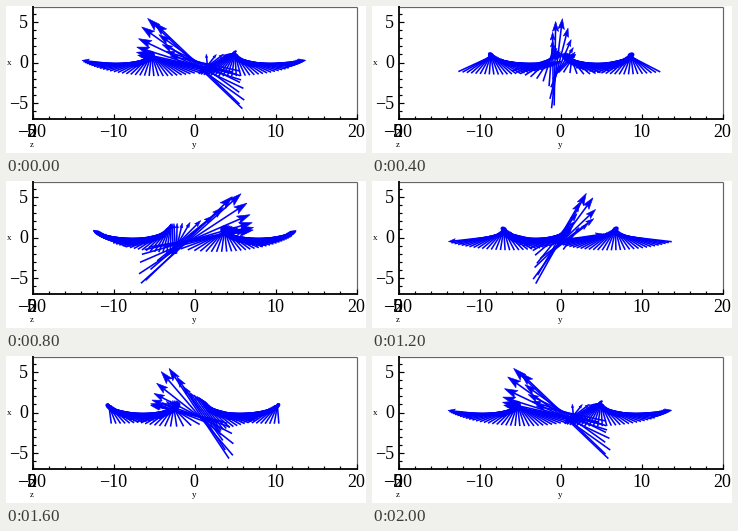
A matplotlib script for the animation above (2100 ms loop, 360x147 px).

```python
import numpy as np
import matplotlib.pyplot as plt
from matplotlib.animation import FuncAnimation
from matplotlib.collections import LineCollection, PolyCollection

W, H, DPI = 360, 147, 100
PX = 72 / DPI                      # one pixel in points
UNIT = 8.1                         # pixels per data unit
CX, CY = 188, 56                   # pixel position of the data origin
FRAMES, PERIOD = 21, 20
BLUE = "#0000ff"

HALF_WAVE = 8.75
K = np.pi / HALF_WAVE
Y = np.arange(-10.375, 10.5, 0.25)  # arrow midpoints along the y axis
R, SIDE = np.abs(Y), np.sign(Y)


def field(frame):
    """Half vectors (y, x) of the field at every midpoint."""
    wt = 2 * np.pi * frame / PERIOD
    swing = np.cos(wt - 0.6 * np.pi)

    # outgoing wave: arrows turn about fronts that run away from the centre
    front = 5.15 + HALF_WAVE * wt / np.pi
    front = front + 0.4 * SIDE * swing / (1 + (R / 6) ** 2)
    bias = 0.35 * SIDE * np.cos(K * R - wt)
    psi = K * (R - front)
    psi = (psi + np.pi / 2 - bias) % np.pi - np.pi / 2 + bias
    far_y = -3.6 * SIDE * np.sin(psi)
    far_x = (1.75 - 0.05 * R) * np.cos(psi)

    # strong field close to the swinging source
    d = Y + 0.55 * swing
    near_y = -6.2 * np.cos(wt + np.pi / 8) + 0.8 * np.tanh(d / 0.3)
    peak = 1 / (1 + (d / 0.6) ** 2)
    near = 1 / (1 + (Y / 1.5) ** 4)
    vy = near * near_y + (1 - near) * far_y
    vx = 5.6 * peak + (1 - near) * far_x
    return vy, vx


def arrows(frame):
    """Shaft segments and head polygons in pixels."""
    vy, vx = field(frame)
    mid = np.column_stack([CX + UNIT * Y, np.full_like(Y, CY + 1.5)])
    half = UNIT * np.column_stack([vy, -vx])
    tail, tip = mid - half, mid + half
    size = 2 * np.hypot(*half.T)[:, None]
    along = 2 * half / np.maximum(size, 1e-6)
    across = along[:, ::-1] * [-1, 1]
    head = np.minimum(13, 1.5 + 0.1 * size)
    back, notch = tip - along * head, tip - along * head * 0.8
    wing = across * head * 0.31
    shafts = np.stack([tail, notch], axis=1)
    heads = np.stack([tip, back + wing, notch, back - wing], axis=1)
    return shafts, heads


fig = plt.figure(figsize=(W / DPI, H / DPI), dpi=DPI, facecolor="white")
ax = fig.add_axes([0, 0, 1, 1])
ax.set_xlim(0, W)
ax.set_ylim(H, 0)
ax.axis("off")


def line(x0, y0, x1, y1, width=1.0, color="black"):
    ax.plot([x0, x1], [y0, y1], color=color, lw=width * PX,
            solid_capstyle="butt", zorder=1)


def label(x, y, s, size=18, ha="center"):
    ax.text(x, y, s, family="Liberation Serif", size=size * PX, ha=ha,
            va="center_baseline", color="black", zorder=4)


LEFT, RIGHT, TOP, BOTTOM = 26.5, 350.5, 0.5, 112.5
line(LEFT, TOP, RIGHT, TOP, 1.2, "#666666")
line(RIGHT, TOP, RIGHT, BOTTOM, 1.2, "#666666")
line(LEFT, 0, LEFT, BOTTOM + 1, 1.8)
line(LEFT - 1, BOTTOM, RIGHT + 1, BOTTOM, 1.8)

for v in range(-20, 21, 2):
    x = CX + 0.5 + UNIT * v
    line(x, BOTTOM, x, BOTTOM - (5 if v % 10 == 0 else 3), 1.2)
for v in range(-6, 7):
    y = CY + 0.5 - UNIT * v
    line(LEFT, y, LEFT + (5 if v % 5 == 0 else 3), y, 1.2)

for v in (-20, -10, 0, 10, 20):
    label(CX + UNIT * v, 124.5, str(v).replace("-", "\u2212"))
for v in (-5, 0, 5):
    s = str(v).replace("-", "\u2212")
    label(22, CY - UNIT * v, s, ha="right")
    label(30, 124.5, s, ha="right")
label(3.5, 56, "x", 9)
label(188, 138, "y", 9)
label(26, 138, "z", 9)

shaft_art = LineCollection([], colors=BLUE, linewidths=1.6 * PX, zorder=2)
head_art = PolyCollection([], facecolors=BLUE, edgecolors=BLUE,
                          linewidths=0.6 * PX, zorder=3)
ax.add_collection(shaft_art)
ax.add_collection(head_art)


def update(frame):
    shafts, heads = arrows(frame)
    shaft_art.set_segments(shafts)
    head_art.set_verts(heads)
    return shaft_art, head_art


anim = FuncAnimation(fig, update, frames=FRAMES, interval=100,
                     repeat=True, repeat_delay=0, blit=False)
plt.show()
```
